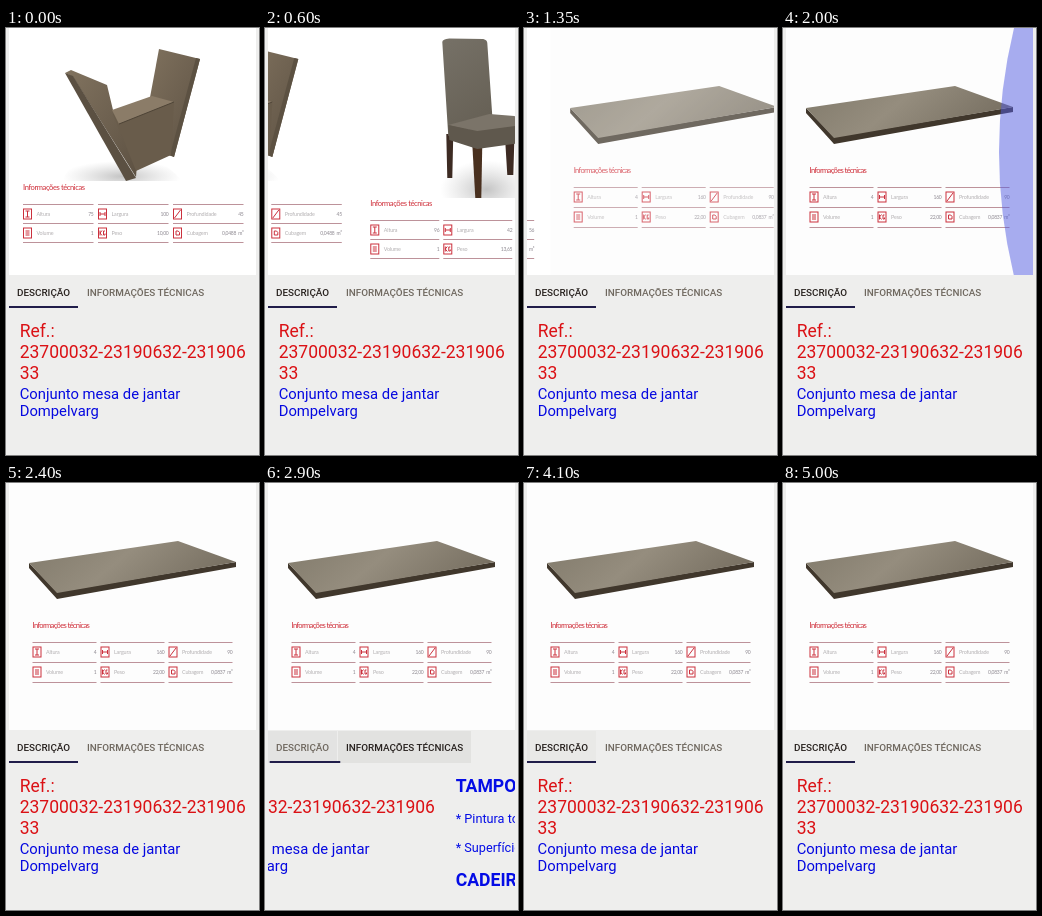
An HTML page for the animation above (5050 ms loop, 253 by 427 pixels).

```html
<!DOCTYPE html>
<html lang="pt-BR">
<head>
<meta charset="utf-8">
<title>Conjunto mesa de jantar</title>
<style>
  html, body { margin: 0; width: 100%; height: 100%; overflow: hidden; background: #eeeeed; }
  svg { display: block; width: 253px; height: 427px; }
  text { font-family: Roboto, Arial, sans-serif; }
  .title, .spec { font-family: Lato, "Open Sans", sans-serif; }
  .title { font-size: 7.6px; letter-spacing: -.42px; fill: #cf2f3a; }
  #top .title { letter-spacing: -.67px; }
  .spec { font-size: 5.4px; letter-spacing: -.15px; fill: #b3b0b2; }
  .value { font-size: 5px; text-anchor: end; fill: #8d8890; letter-spacing: -.25px; }
  .rule { stroke: #bd929a; stroke-width: 1; }
  .icon { fill: none; stroke: #cb303d; stroke-width: 1; }
  .tab { font-size: 9.9px; font-weight: 500; }
  .ref { font-size: 17.5px; fill: #db1115; }
  .name { font-size: 14.8px; fill: #0508e0; }
  .head { font-size: 17.6px; font-weight: 700; fill: #040ce6; }
  .item { font-size: 12.7px; fill: #040ce6; }
</style>
</head>
<body>
<svg viewBox="0 0 253 427">
  <defs>
    <clipPath id="photoClip"><rect x="3" width="247" height="247"/></clipPath>
    <clipPath id="pageClip"><rect x="3" y="281" width="247" height="146"/></clipPath>
    <linearGradient id="wood" x2="1" y2="1">
      <stop stop-color="#81735f"/><stop offset=".5" stop-color="#6f6251"/><stop offset="1" stop-color="#5d5142"/>
    </linearGradient>
    <linearGradient id="fabric" y2="1" x2=".4">
      <stop stop-color="#767167"/><stop offset="1" stop-color="#676156"/>
    </linearGradient>
    <linearGradient id="glass" x2="1" y2=".3">
      <stop stop-color="#817a6b"/><stop offset=".5" stop-color="#958d7e"/><stop offset="1" stop-color="#797163"/>
    </linearGradient>
    <radialGradient id="shade" cy=".85">
      <stop stop-color="#888" stop-opacity=".5"/><stop offset="1" stop-color="#aaa" stop-opacity="0"/>
    </radialGradient>
    <path id="ico0" d="M2.5 2.5h4M4.5 2.5v6M2.5 8.5h4"/>
    <path id="ico1" d="M2 3.5v4M7 3.5v4M2 5.5h5"/>
    <path id="ico2" d="M1.5 9.5L7.5 1.5"/>
    <path id="ico3" d="M2.5 3.5h4M2.5 5.5h4M2.5 7.5h4"/>
    <path id="ico4" d="M2 3v5M4 3L2 5.5L4 8M7 3.5H5.5V7.5H7V6"/>
    <path id="ico5" d="M3 3.5h2.2l1.3 1.4v2.6H3z"/>
  </defs>

  <g clip-path="url(#photoClip)">
    <rect x="3" width="247" height="247" fill="#fff"/>
    <g id="slides">
      <g id="stool">
        <path d="M56 153Q70 122 110 122T176 153Z" fill="url(#shade)"/>
        <path d="M153 21L194 31L168 129L135 118Z" fill="url(#wood)"/>
        <path d="M190 30L194 31L168 129L164 127Z" fill="#5c5142"/>
        <path d="M59 45L65 42L101 57L107 82L133 110L130 149L67 49Z" fill="url(#wood)"/>
        <path d="M107 86L168 75L165 127L130 143Z" fill="#695c4b"/>
        <path d="M106 82L146 68L168 74L113 96Z" fill="#8b7c68"/>
        <path d="M113 96L168 74" stroke="#4d4336"/>
        <path d="M59 45L67 48L130 150L120 153Z" fill="#5b5042"/>
      </g>
      <g id="chair" transform="translate(247)">
        <rect x="89" y="112" width="92" height="58" fill="url(#shade)"/>
        <path d="M95 106H102L101 150H96ZM154 114H163L162 147H156Z" fill="#3d2b23"/>
        <path d="M121 116H131L130 170H124Z" fill="#49301f"/>
        <path d="M91 14Q91 11 98 10.500L132 11Q136 12 136 15L141 88L97 108Z" fill="url(#fabric)"/>
        <path d="M97 97L138 86L163 88Q171 91 171 98L126 104Z" fill="#7b7469"/>
        <path d="M97 97L126 103L171 97L170 115L126 121L98 112Z" fill="#5f584d"/>
      </g>
      <g id="top" transform="translate(494)">
        <rect x="3" width="247" height="247" fill="#fdfdfd"/>
        <path d="M23 80L51 109L230 79V84L51 116L23 85Z" fill="#40372c"/>
        <path d="M23 80L172 58L230 79L51 110Z" fill="url(#glass)"/>
      </g>
    </g>
    <path id="glow" fill="#535de1"/>
  </g>

  <rect id="press0" x="3" y="248" width="69" height="32" fill="#cfcfca"/>
  <rect id="press1" x="73" y="248" width="133" height="32" fill="#cfcfca"/>
  <text id="tab0" class="tab" x="11" y="268">DESCRIÇÃO</text>
  <text id="tab1" class="tab" x="81" y="268">INFORMAÇÕES TÉCNICAS</text>
  <rect id="bar" y="278" height="2" fill="#201d4a"/>

  <g clip-path="url(#pageClip)">
    <g id="pages">
      <g class="ref">
        <text x="13.700" y="309">Ref.:</text>
        <text x="13.700" y="330">23700032-23190632-231906</text>
        <text x="13.700" y="351">33</text>
      </g>
      <g class="name">
        <text x="13.700" y="371">Conjunto mesa de jantar</text>
        <text x="13.700" y="388">Dompelvarg</text>
      </g>
      <g transform="translate(247)">
        <text class="head" x="13.500" y="309">TAMPO:</text>
        <text class="item" x="13.500" y="340">* Pintura touch</text>
        <text class="item" x="13.500" y="369">* Superfície de vidro</text>
        <text class="head" x="13.500" y="403">CADEIRA:</text>
      </g>
    </g>
  </g>
</svg>
<script>
  const $ = id => document.getElementById(id);
  const LOOP = 5050, STEP = 50, WIDTH = 247;
  const LABELS = ['Altura', 'Largura', 'Profundidade', 'Volume', 'Peso', 'Cubagem'];

  // Specification grid: left edge x, column pitch, column width, first rule y, row height
  function addSpecs(id, x, pitch, width, y, row, values) {
    let out = `<text class="title" x="${x}" y="${y - 14}">Informações técnicas</text>`;
    for (let c = 0; c < 3; c++) {
      const left = x + c * pitch;
      for (let r = 0; r < 3; r++) {
        const top = y + r * row;
        out += `<path class="rule" d="M${left} ${top + .5}h${width}"/>`;
        if (r > 1) continue;
        const i = r * 3 + c;
        out += `<g class="icon" transform="translate(${left} ${top + 4.5})">
          <rect x=".5" y=".5" width="8" height="10"/><use href="#ico${i}"/></g>
          <text class="spec" x="${left + 13.5}" y="${top + 12}">${LABELS[i]}</text>
          <text class="spec value" x="${left + width}" y="${top + 11.5}">${values[i]}</text>`;
      }
    }
    $(id).insertAdjacentHTML('beforeend', out);
  }
  addSpecs('stool', 17, 75, 70.5, 176, 19, ['75', '100', '45', '1', '10,00', '0,0488 &#160;m³']);
  addSpecs('chair', 19, 73, 69, 192, 19, ['96', '42', '56', '1', '13,65', '0,1210 &#160;m³']);
  addSpecs('top', 26.5, 68, 64, 159, 20, ['4', '160', '90', '1', '22,00', '0,0837 &#160;m³']);

  const clamp = x => Math.min(1, Math.max(0, x));
  const ramp = (t, from, to) => clamp((t - from) / (to - from));
  const pulse = (t, from, peak, to) => Math.min(ramp(t, from, peak), 1 - ramp(t, peak, to));

  // Soft start, long settling end
  function glide(t, from, to) {
    const u = 1 - (1 - ramp(t, from, to)) ** 2;
    return u * u * (3 - 2 * u);
  }

  function set(id, attrs) {
    for (const key in attrs) $(id).setAttribute(key, attrs[key]);
  }

  function draw(t) {
    const slide = glide(t, 400, 942) + glide(t, 1150, 1504);
    const page = glide(t, 2800, 3315) - glide(t, 3650, 4165);
    set('slides', { transform: `translate(${-WIDTH * slide})` });
    set('pages', { transform: `translate(${-WIDTH * page})` });
    set('top', { opacity: .5 + .5 * ramp(t, 1150, 1550) });

    const pull = pulse(t, 1800, 2000, 2400);
    const edge = 250 - 19 * pull, bulge = 250 - 49 * pull;
    set('glow', { d: `M250 0H${edge}Q${bulge} 124 ${edge} 248H250Z`, opacity: .5 * pull });

    const tab = glide(t, 2880, 3300) - glide(t, 3680, 4100);
    set('bar', { x: 3 + 70 * tab, width: 69 + 64 * tab });
    set('press0', { opacity: .35 * pulse(t, 2800, 2900, 3100) + .5 * pulse(t, 3550, 3700, 4300) });
    set('press1', { opacity: .4 * pulse(t, 2750, 2900, 3450) });

    const second = t >= 2850 && t < 3700;
    set('tab0', { fill: second ? '#6f685f' : '#28221f' });
    set('tab1', { fill: second ? '#28221f' : '#6f685f' });
  }

  const start = performance.now();
  function tick() {
    // Whole steps, with a little slack for timer rounding
    const t = (performance.now() - start + 12) % LOOP;
    draw(Math.floor(t / STEP) * STEP);
    requestAnimationFrame(tick);
  }
  tick();
</script>
</body>
</html>
```
